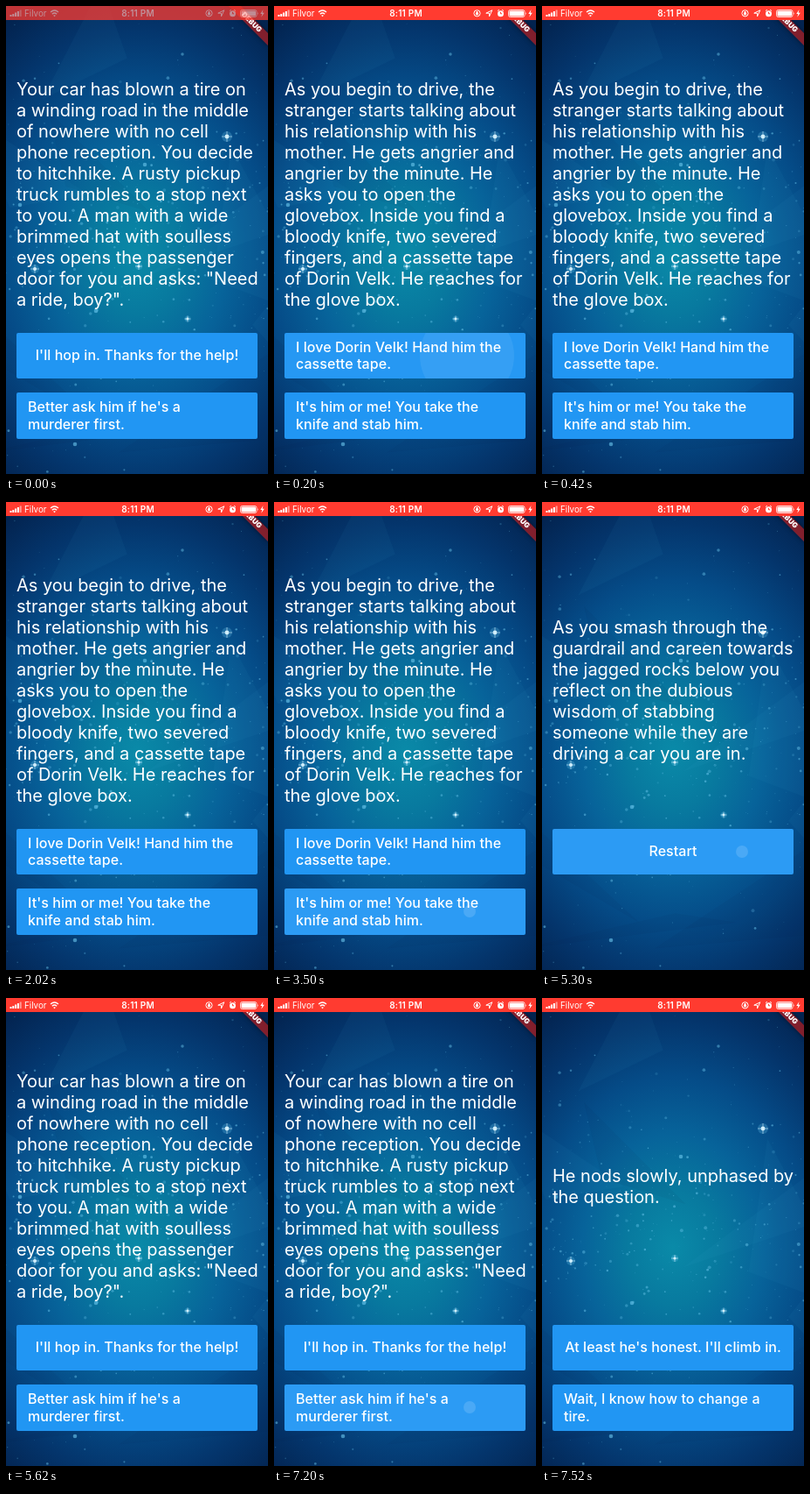
Recreate the animation shown at these times as an HTML page with a canvas. Size 300x534 px, loop 8000 ms.

```html
<!DOCTYPE html>
<html lang="en">
<head>
<meta charset="utf-8">
<title>Story game</title>
<style>
  html, body { margin: 0; width: 100%; height: 100%; overflow: hidden; background: #03204c; }
  #stage { position: relative; width: 300px; height: 534px; overflow: hidden; color: #fff; font-family: Inter, Roboto, sans-serif; }
  #sky, #bar { position: absolute; left: 0; top: 0; }
  #story { position: absolute; left: 12px; top: 215px; transform: translateY(-50%); white-space: pre; font-size: 20px; line-height: 24px; letter-spacing: -0.02px; }
  .btn { position: absolute; left: 12px; top: 372.8px; width: 276px; height: 52.4px; border-radius: 2px; overflow: hidden; background: #2196f3; display: flex; align-items: center; justify-content: center; }
  .btn + .btn { top: 441.4px; }
  .btn span { position: relative; white-space: pre; font-size: 16px; line-height: 19.2px; font-weight: 500; letter-spacing: .06px; }
  .btn.wide span { width: 250px; }
  .btn i { position: absolute; top: 26px; border-radius: 50%; background: #fff; transform: translate(-50%, -50%); }
  .btn b { position: absolute; inset: 0; background: #fff; }
  #banner { position: absolute; left: 248.8px; top: 14.4px; width: 64px; height: 9.6px; transform: rotate(45deg); background: rgba(183, 28, 28, .7); box-shadow: 0 0 5px rgba(0, 0, 0, .5); font-size: 8.2px; line-height: 9.6px; font-weight: 900; text-align: center; }
</style>
</head>
<body>
<div id="stage">
  <canvas id="sky" width="300" height="534"></canvas>
  <div id="story"></div>
  <div class="btn"><b></b><i></i><span></span></div>
  <div class="btn"><b></b><i></i><span></span></div>
  <div id="banner">DEBUG</div>
  <svg id="bar" width="300" height="16" fill="#fff">
    <rect width="300" height="16" fill="#ff3b30"/>
    <g id="ink">
      <path d="M4.500 10h2v2h-2zM7.300 9h2v3h-2zM10.100 7.500h2v4.500h-2zM12.900 6h2v6h-2z"/>
      <path d="M15.700 4.500h2v7.500h-2z" opacity=".5"/>
      <text x="21" y="12" font-size="9.8">Filvor</text>
      <g fill="none" stroke="#fff">
        <path d="M51 7q4.500-4 9 0M52.800 9.200q2.700-2.400 5.400 0" stroke-width="1.300"/>
        <circle cx="232.500" cy="8.300" r="3.600"/>
        <path d="M256 5.600l1.800-1.400M263 5.600l-1.800-1.400"/>
        <path d="M242.800 8.200l7-3.400-3.300 7.200v-3.800z"/>
        <rect x="268.500" y="4.500" width="18.500" height="8" rx="2" stroke-width=".8"/>
      </g>
      <circle cx="259.500" cy="8.700" r="3.500"/>
      <path d="M259.500 6.800v2h1.500" fill="none" stroke="#ff3b30"/>
      <path d="M55.500 12.300l-1.400-1.500q1.400-1.100 2.800 0z"/>
      <path d="M231 7.800h3v2.400h-3zM231.500 8v-1a1 1 0 0 1 2 0v1z"/>
      <rect x="269.500" y="5.500" width="16.500" height="6" rx="1"/>
      <path d="M288 7q1.300 1.500 0 3zM294.500 4l-3.200 5h2l-1 3.800 3.500-5h-2.200z"/>
      <text x="151" y="12" font-size="10" font-weight="600" letter-spacing=".2" text-anchor="middle">8:11 PM</text>
    </g>
  </svg>
</div>
<script>
const LOOP = 8000;
const PRESS = 100;        // a tap starts this long before its page opens
const RIPPLE = 320;

const intro = {
  story: `Your car has blown a tire on
a winding road in the middle
of nowhere with no cell
phone reception. You decide
to hitchhike. A rusty pickup
truck rumbles to a stop next
to you. A man with a wide
brimmed hat with soulless
eyes opens the passenger
door for you and asks: "Need
a ride, boy?".`,
  choices: ["I'll hop in. Thanks for the help!", "Better ask him if he's a\nmurderer first."]
};
const drive = {
  story: `As you begin to drive, the
stranger starts talking about
his relationship with his
mother. He gets angrier and
angrier by the minute. He
asks you to open the
glovebox. Inside you find a
bloody knife, two severed
fingers, and a cassette tape
of Dorin Velk. He reaches for
the glove box.`,
  choices: ["I love Dorin Velk! Hand him the\ncassette tape.", "It's him or me! You take the\nknife and stab him."]
};
const crash = {
  story: `As you smash through the
guardrail and careen towards
the jagged rocks below you
reflect on the dubious
wisdom of stabbing
someone while they are
driving a car you are in.`,
  choices: ["Restart"]
};
const nod = {
  story: "He nods slowly, unphased by\nthe question.",
  choices: ["At least he's honest. I'll climb in.", "Wait, I know how to change a\ntire."]
};

// each page opens after a tap on a button, at x inside it
const steps = [
  { at: 0, page: intro },
  { at: 200, page: drive, button: 0, x: 209 },
  { at: 3600, page: crash, button: 1, x: 212 },
  { at: 5400, page: intro, button: 0, x: 217 },
  { at: 7300, page: nod, button: 1, x: 212 }
];

const $ = id => document.getElementById(id);
const buttons = [...document.querySelectorAll(".btn")].map(el => ({
  el, label: el.querySelector("span"), dot: el.querySelector("i"), glow: el.querySelector("b")
}));
const lastStep = t => steps.filter(s => s.at <= t).pop();

function showPage(page) {
  $("story").textContent = page.story;
  buttons.forEach(({ el, label }, i) => {
    const text = page.choices[i] || "";
    el.style.display = text ? "flex" : "none";
    label.textContent = text;
    el.classList.toggle("wide", text.includes("\n"));
  });
}

function showTap(t) {
  const tap = lastStep(t + PRESS);
  const age = t + PRESS - tap.at;
  const tick = Math.floor(age / 100);
  buttons.forEach(({ dot, glow }, i) => {
    const fade = tap.button === i && age < RIPPLE ? 2 ** -tick : 0;
    dot.style.opacity = .14 * fade;
    glow.style.opacity = .05 * fade;
    if (!fade) return;
    dot.style.left = tap.x + "px";
    dot.style.width = dot.style.height = 2 * (7 + 47 * tick) + "px";
  });
}

function drawSky() {
  const c = $("sky").getContext("2d");
  let seed = 11;
  const rnd = () => (seed = seed * 16807 % 2147483647) / 2147483647;

  c.save();
  c.translate(150, 285);
  c.scale(1, 1.25);
  const glow = c.createRadialGradient(0, 0, 0, 0, 0, 260);
  ["#0a8aa8", "#087a9f", "#07639a", "#054c88", "#04356c", "#03234f"]
    .forEach((color, i, all) => glow.addColorStop(i / (all.length - 1), color));
  c.fillStyle = glow;
  c.fillRect(-150, -285, 300, 534);
  c.restore();

  // faint facets
  for (let i = 0; i < 10; i++) {
    const x = rnd() * 300, y = rnd() * 534;
    c.globalAlpha = .05;
    c.fillStyle = i % 2 ? "#001838" : "#4ac";
    c.beginPath();
    for (let k = 0; k < 3; k++) c.lineTo(x + (rnd() - .5) * 260, y + (rnd() - .5) * 260);
    c.fill();
  }

  const dot = (x, y, r, alpha, color = "#6cc8ee") => {
    c.globalAlpha = alpha;
    c.fillStyle = color;
    c.beginPath();
    c.arc(x, y, r, 0, 7);
    c.fill();
  };
  for (let i = 0; i < 420; i++) {
    const y = 16 + (rnd() + rnd()) * 259;
    dot(rnd() * 300, y, .4 + rnd() ** 3 * 1.6, .15 + rnd() * .4);
  }

  const star = (x, y, r) => {
    dot(x, y, r, .25);
    dot(x, y, r * .4, .95, "#d8f4ff");
    c.globalAlpha = .7;
    c.fillRect(x - r, y - .4, 2 * r, .8);
    c.fillRect(x - .4, y - r, .8, 2 * r);
  };
  star(253, 149, 6);
  star(33, 300, 5);
  star(152, 297, 4);
  star(208, 357, 3.5);
  for (const [x, y] of [[159, 181], [103, 348], [16, 227], [79, 500]]) dot(x, y, 2.3, .6);
}

let current;
function frame() {
  const t = performance.now() % LOOP;
  const { page } = lastStep(t);
  if (page !== current) showPage(current = page);
  showTap(t);
  const dim = t < 100;
  $("bar").style.opacity = dim ? .75 : 1;
  $("ink").style.opacity = dim ? .6 : 1;
  requestAnimationFrame(frame);
}
drawSky();
frame();
</script>
</body>
</html>
```
